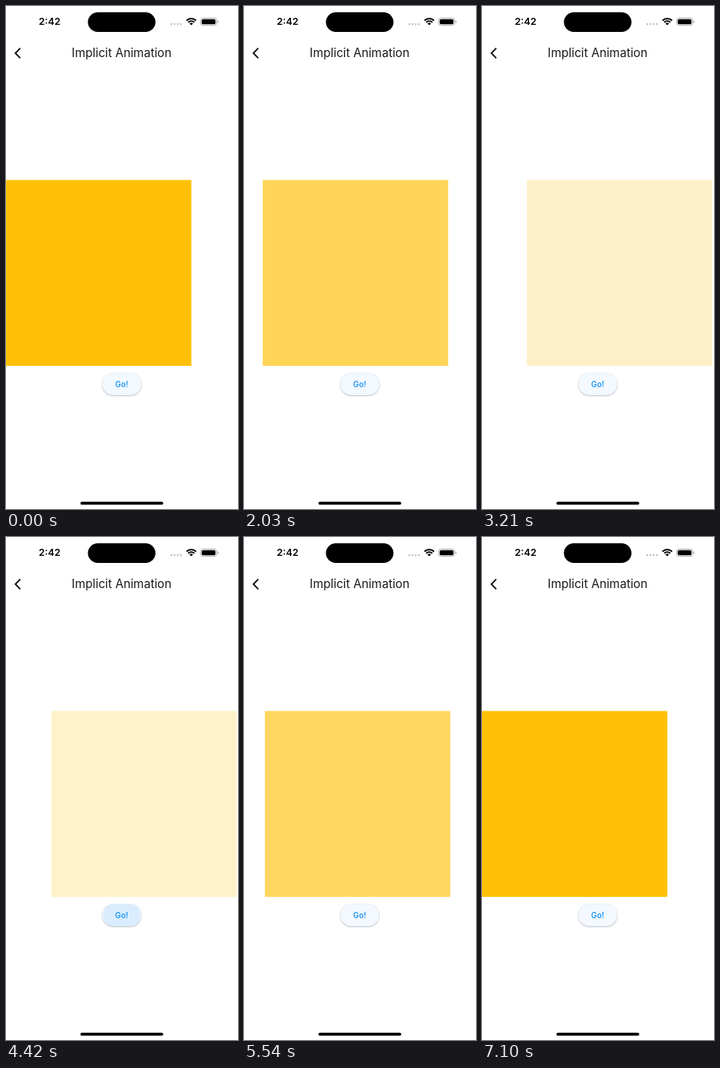
An HTML page with a canvas that plays this animation: 296x640 px, repeating every 9800 ms.

```html
<!DOCTYPE html>
<html lang="en">
<head>
<meta charset="utf-8">
<title>Implicit Animation</title>
<style>
  html, body { margin: 0; width: 100%; height: 100%; overflow: hidden; background: #fff; }
  canvas { display: block; width: 296px; height: 640px; }
</style>
</head>
<body>
<canvas id="stage"></canvas>
<script>
const W = 296, H = 640, LOOP = 9800;
const canvas = document.getElementById('stage');
const ctx = canvas.getContext('2d');
const dpr = window.devicePixelRatio || 1;
canvas.width = W * dpr;
canvas.height = H * dpr;

// The screen refreshes only at these moments (ms).
const TICKS = [
  0, 1130, 1240, 1360, 1480, 1590, 1700, 1810, 1920, 2030,
  2150, 2270, 2380, 2500, 2620, 2740, 2850, 2970, 3090, 3210,
  4310, 4420, 4530, 4640, 4740, 4850, 4950, 5060, 5180,
  5300, 5410, 5530, 5640, 5760, 5870, 5980, 6090, 6210, 6320, 6440, 7100
];
const FORWARD = 1184, BACK = 4382, DURATION = 2090;
const SIZE = 236.5, TRAVEL = 59.1;

const clamp = v => Math.max(0, Math.min(1, v));
const ramp = (t, from, to) => clamp((t - from) / (to - from));

function pill(x, y, w, h, r = h / 2) {
  ctx.beginPath();
  ctx.roundRect(x, y, w, h, r);
}

function fillPill(color, ...box) {
  ctx.fillStyle = color;
  pill(...box);
  ctx.fill();
}

function label(text, x, y, size, weight, color) {
  ctx.font = `${weight} ${size}px Inter, Roboto, sans-serif`;
  ctx.textAlign = 'center';
  ctx.fillStyle = color;
  ctx.fillText(text, x, y);
}

function drawWifi(x, y) {
  const from = -Math.PI * 0.75, to = -Math.PI * 0.25;
  ctx.strokeStyle = ctx.fillStyle = '#000';
  ctx.lineWidth = 1.9;
  for (const r of [8.6, 5.5]) {
    ctx.beginPath();
    ctx.arc(x, y, r, from, to);
    ctx.stroke();
  }
  ctx.beginPath();
  ctx.moveTo(x, y);
  ctx.arc(x, y, 3.2, from, to);
  ctx.fill();
}

function drawBattery() {
  ctx.strokeStyle = '#a6a6a6';
  ctx.lineWidth = 0.9;
  pill(248.3, 15.3, 20.4, 9.4, 3);
  ctx.stroke();
  fillPill('#000', 249.7, 16.7, 17.6, 6.6, 1.9);
  fillPill('#a6a6a6', 269.8, 18.4, 1.2, 3.2, 0.6);
}

function drawChrome() {
  label('2:42', 55.6, 24.4, 12.4, 600, '#000');
  fillPill('#000', 104.5, 8, 86.2, 25);
  for (let i = 0; i < 4; i++) fillPill('#c6c6c6', 209.6 + i * 4.1, 21.8, 2.6, 2.6);
  drawWifi(236.4, 24.6);
  drawBattery();

  ctx.strokeStyle = '#111';
  ctx.lineWidth = 1.8;
  ctx.beginPath();
  ctx.moveTo(18.2, 53.7);
  ctx.lineTo(12, 60);
  ctx.lineTo(18.2, 66.3);
  ctx.stroke();

  label('Implicit Animation', 147.5, 65.3, 15.2, 400, '#1a1a1a');
  fillPill('#000', 95, 630.8, 105.6, 3.7);
}

function drawButton(t) {
  const box = [123, 467.3, 49.4, 27.7];
  ctx.save();
  ctx.shadowColor = 'rgba(40, 60, 80, 0.38)';
  ctx.shadowBlur = 2.4 * dpr;
  ctx.shadowOffsetY = 0.8 * dpr;
  fillPill('#f3f9ff', ...box);
  ctx.restore();

  const since = t - (t < BACK - 200 ? FORWARD : BACK);
  const alpha = 0.12 * ramp(since, -110, -10) * (1 - ramp(since, 190, 430));
  if (alpha > 0) {
    ctx.save();
    pill(...box);
    ctx.clip();
    ctx.fillStyle = `rgba(33, 150, 243, ${alpha})`;
    ctx.beginPath();
    ctx.arc(147.7, 481, 8 + 22 * ramp(since, -110, 100), 0, Math.PI * 2);
    ctx.fill();
    ctx.restore();
  }
  label('Go!', 147.6, 484.8, 9.8, 600, '#2196f3');
}

function drawSquare(t) {
  const p = ramp(t, FORWARD, FORWARD + DURATION) - ramp(t, BACK, BACK + DURATION);
  ctx.fillStyle = `rgba(255, 193, 7, ${1 - 0.8 * p})`;
  ctx.fillRect(TRAVEL * p, 221.4, SIZE, SIZE);
}

function draw(t) {
  ctx.setTransform(dpr, 0, 0, dpr, 0, 0);
  ctx.fillStyle = '#fff';
  ctx.fillRect(0, 0, W, H);
  drawChrome();
  drawSquare(t);
  drawButton(t);
}

const start = performance.now();
function frame() {
  const now = (performance.now() - start) % LOOP;
  draw(TICKS.findLast(tick => tick <= now));
  requestAnimationFrame(frame);
}
frame();
</script>
</body>
</html>
```
